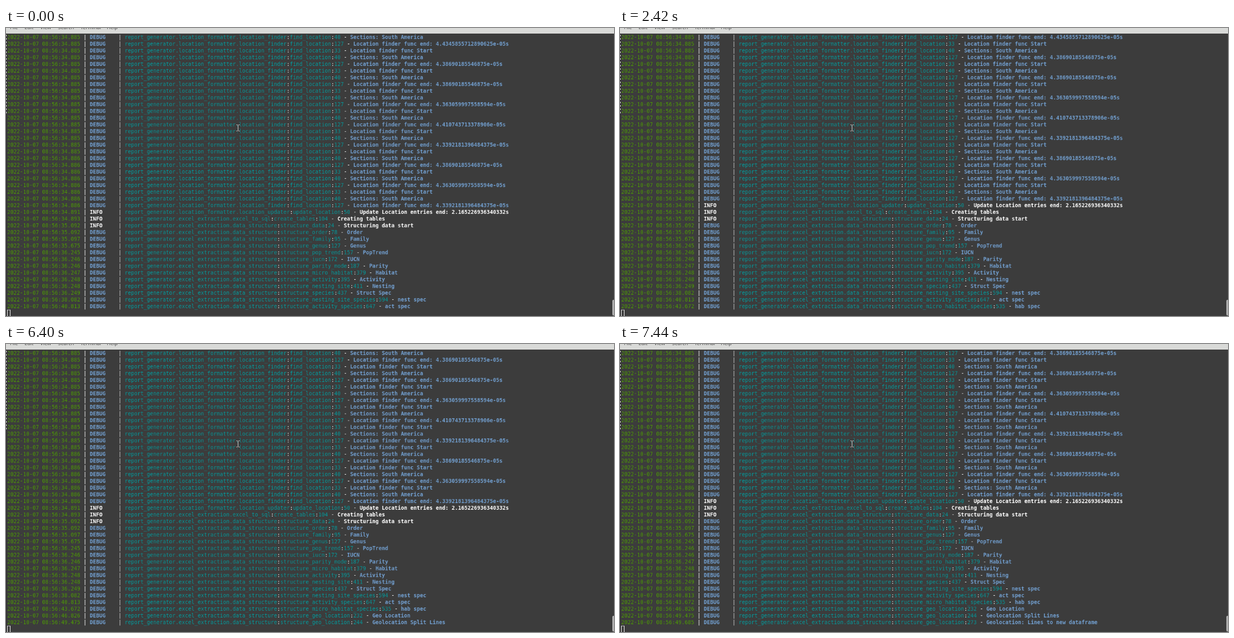
Write an HTML page that moves like this. It is 1086 by 516 pixels and loops after 8 s.

```html
<!DOCTYPE html>
<html lang="en">
<head>
<meta charset="utf-8">
<title>Report generator log</title>
<style>
  html, body { margin: 0; width: 100%; height: 100%; overflow: hidden; background: #3c3c3c; }
  #stage { position: relative; width: 1086px; height: 516px; overflow: hidden; background: #3c3c3c; }
  #menu { position: absolute; left: 0; top: 0; width: 100%; height: 10px; overflow: hidden; background: #d9dad8; }
  #menu span {
    position: absolute; top: -9px; color: #4a4a4a; white-space: pre;
    font: 9px/16px "Noto Sans", sans-serif; text-rendering: geometricPrecision;
  }
  #edge { position: absolute; left: 0; top: 10px; width: 1px; bottom: 0; background: #2a2a2a; }
  #ticks {
    position: absolute; left: 0; top: 12px; width: 1px; height: 143px;
    background: repeating-linear-gradient(#ddd 0 3px, #2a2a2a 3px 6px);
  }
  /* Cells of 8 x 17 px, drawn at full size and then scaled down as one layer */
  #term {
    position: absolute; left: 0; top: 0; width: 1520px; height: 714px;
    transform: translate(2.1px, 10.4px) scale(.7092); transform-origin: 0 0; will-change: transform;
    font: 13.29px/17px "DejaVu Sans Mono", monospace;
    font-variant-ligatures: none; color: #fff;
  }
  #view { position: absolute; left: 0; top: 0; width: 100%; height: 697px; overflow: hidden; }
  #log { position: absolute; left: 0; top: 0; }
  #log div { height: 17px; white-space: pre; }
  .time { color: #4e9a06; }
  .name { color: #06989a; }
  .debug, .info { font-weight: bold; }
  .debug { color: #729fcf; }
  .info { color: #fff; }
  #caret { position: absolute; left: 0; top: 697px; width: 8px; height: 17px; border: 1px solid #fff; box-sizing: border-box; }
  #thumb { position: absolute; left: 1083px; top: 487px; width: 5px; height: 28px; border-radius: 2px; background: #b0b0b0; }
  #mouse { position: absolute; left: 409px; top: 172px; }
</style>
</head>
<body>
<div id="stage">
  <div id="menu"></div>
  <div id="edge"></div>
  <div id="ticks"></div>
  <div id="term">
    <div id="view"><div id="log"></div></div>
    <div id="caret"></div>
  </div>
  <div id="thumb"></div>
  <svg id="mouse" width="11" height="14" fill="none">
    <path d="M2.5 1.5H4.5L5.5 2.5L6.5 1.5H8.5M5.5 2.5V11.5M2.5 12.5H4.5L5.5 11.5L6.5 12.5H8.5" stroke="#ddd" stroke-width=".9"/>
  </svg>
</div>
<script>
const ROW = 17;
const LOOP = 8000;
const SCROLL_AT = [0, 500, 3700, 6400, 6600];
const log = document.getElementById("log");

function span(parent, text, cls) {
  const el = document.createElement("span");
  el.textContent = text;
  if (cls) el.className = cls;
  parent.append(el);
  return el;
}

function addLine(time, level, module, func, line, message) {
  const row = document.createElement("div");
  const tone = level.toLowerCase();
  span(row, "2022-10-07 08:56:" + time, "time");
  span(row, " | ");
  span(row, level.padEnd(8), tone);
  span(row, " | ");
  span(row, "report_generator." + module, "name");
  span(row, ":");
  span(row, func, "name");
  span(row, ":");
  span(row, line, "name");
  span(row, " - ");
  span(row, message, tone);
  log.append(row);
}

// Location finder: sections, end and start repeat in turn
const durations = [
  "4.4345855712890625", "4.38690185546875", "4.38690185546875",
  "4.363059997558594", "4.410743713378906", "4.3392181396484375",
  "4.38690185546875", "4.363059997558594", "4.3392181396484375"
];
for (let i = 0; i < 26; i++) {
  const [line, message] = [
    ["40", "Sections: South America"],
    ["127", `Location finder func end: ${durations[Math.floor(i / 3)]}e-05s`],
    ["33", "Location finder func Start"]
  ][i % 3];
  addLine(i < 18 ? "34.885" : "34.886", "DEBUG",
    "location_formatter.location_finder", "find_location", line, message);
}

addLine("34.891", "INFO", "location_formatter.location_updater", "update_location", "50",
  "Update Location entries end: 2.165226936340332s");
addLine("34.893", "INFO", "excel_extraction.excel_to_sql", "create_tables", "104", "Creating tables");

const structure = "excel_extraction.data_structure";
addLine("35.092", "INFO", structure, "structure_data", "24", "Structuring data start");
[
  ["35.092", "order", "78", "Order"],
  ["35.097", "family", "95", "Family"],
  ["35.675", "genus", "127", "Genus"],
  ["36.245", "pop_trend", "157", "PopTrend"],
  ["36.246", "iucn", "172", "IUCN"],
  ["36.246", "parity_mode", "187", "Parity"],
  ["36.247", "micro_habitat", "379", "Habitat"],
  ["36.248", "activity", "395", "Activity"],
  ["36.248", "nesting_site", "411", "Nesting"],
  ["36.249", "species", "437", "Struct Spec"],
  ["38.082", "nesting_site_species", "594", "nest spec"],
  ["40.813", "activity_species", "647", "act spec"],
  ["43.672", "micro_habitat_species", "535", "hab spec"],
  ["46.826", "geo_location", "232", "Geo Location"],
  ["49.475", "geo_location", "244", "Geolocation Split Lines"],
  ["49.685", "geo_location", "273", "Geolocation: Lines to new dataframe"]
].forEach(([time, part, line, message]) =>
  addLine(time, "DEBUG", structure, "structure_" + part, line, message));

const menu = document.getElementById("menu");
[["File", 7], ["Edit", 33], ["View", 61], ["Search", 93], ["Terminal", 133], ["Help", 180]]
  .forEach(([label, x]) => { span(menu, label).style.left = x + "px"; });

// Each new entry pushes the log up by one row at once
const frames = SCROLL_AT.map((t, i) => ({
  offset: t / LOOP, top: -i * ROW + "px", easing: "steps(1, end)"
}));
frames.push({ ...frames[frames.length - 1], offset: 1 });
log.animate(frames, { duration: LOOP, iterations: Infinity });
</script>
</body>
</html>
```
